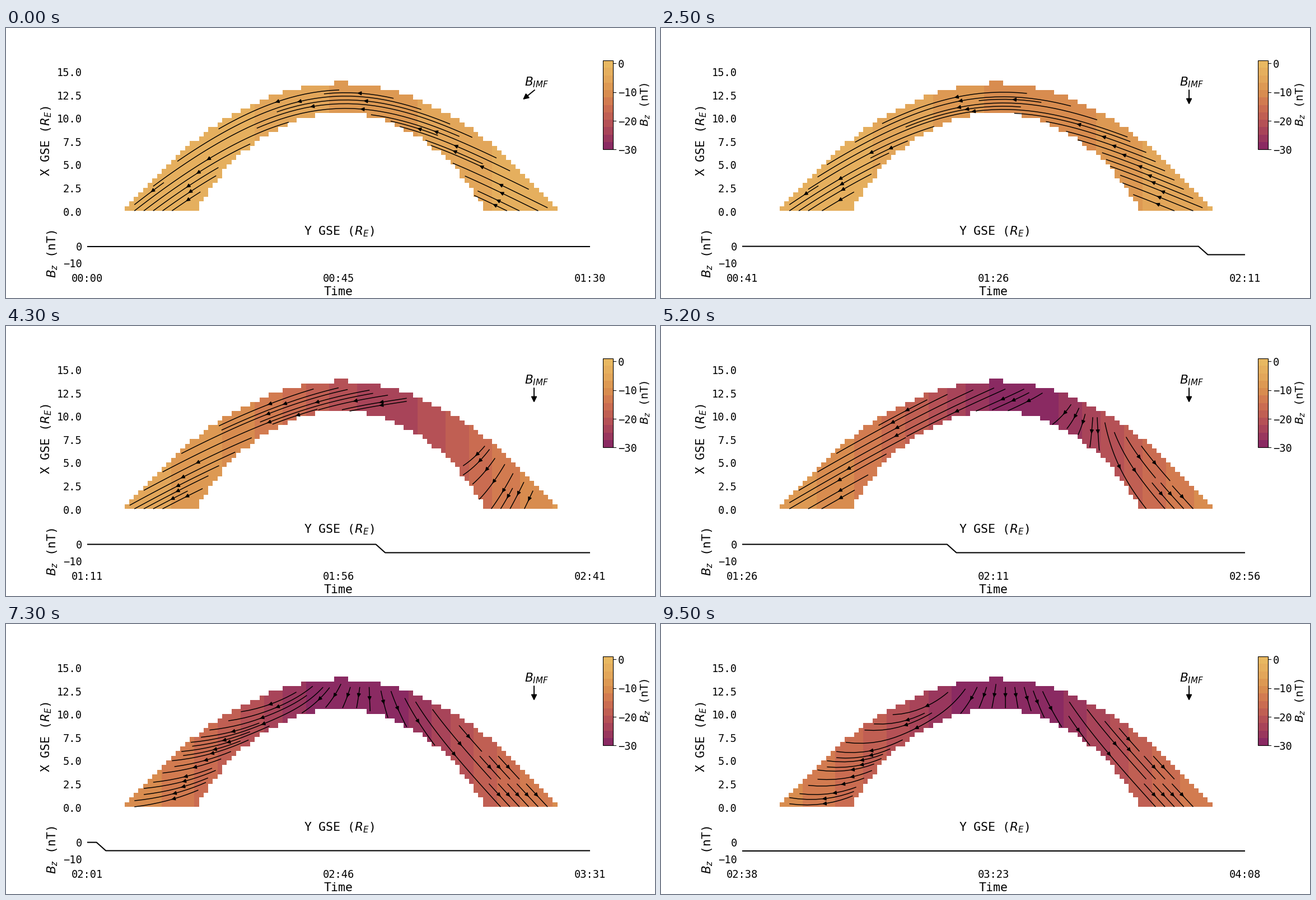
Recreate the animation shown at these times as a matplotlib script. Size 1159 by 483 pixels, loop 9.6 s.

```python
import numpy as np
import matplotlib.pyplot as plt
from matplotlib.animation import FuncAnimation
from matplotlib.collections import LineCollection
from matplotlib.colors import LinearSegmentedColormap
from matplotlib.patches import FancyArrowPatch, Rectangle

W, H, DPI = 1159, 483, 100
FRAMES, INTERVAL = 96, 100
CX, BASE, RE = 594.0, 327.1, 16.63      # pixel of Y=0, pixel of X=0, pixels per Earth radius
NX, NY, CELLS = 120, 40, 60             # field grid and streamline mask
SPAN_Y, SPAN_X = (NX - 1) / 2, (NY - 1) / 2
STEP = 1 / CELLS
FIRST, LAST = 20, 80                    # the sheath only changes between these steps
TURN = 74                               # sample after which the solar wind turns south
TICK, LABEL = 13.5, 15.5

# Sheath: between a parabolic bow shock and a Shue-type magnetopause
y_re, x_re = np.meshgrid(-30 + 0.5 * np.arange(NX), 0.5 * np.arange(NY))
r = np.hypot(x_re, y_re) + 1e-9
shock = 13.51 - 0.0253 * y_re**2
pause = 10.27 - 0.0445 * y_re**2
sheath = (x_re <= shock) & (r >= 10.27 * (2 / (1 + x_re / r))**0.575)
inside = (sheath[:-1, :-1] & sheath[1:, :-1]
          & sheath[:-1, 1:] & sheath[1:, 1:]).tolist()

p = y_re * RE / 390                     # -1 at the left foot, 1 at the right foot
depth = (shock - x_re) / (shock - pause)
flank = np.clip((-94 - RE * y_re) / 80, 0, 1) * (depth - 0.5)
drape = 2 - 34 * np.tanh(1.9 * p) + 4.5 * p**2


def ramp(k, a, b):
    return min(max((k - a) / (b - a), 0), 1)


def south(k):
    """Bz: a peak that deepens, swings right and settles near the nose."""
    keys = [20, 34, 52, 80]
    peak = np.interp(k, keys, [7.5, 17.5, 29, 30.5])
    mid = np.interp(k, keys, [0.16, 0.3, 0.14, 0.07])
    width = np.interp(k, keys, [0.6, 0.6, 0.65, 0.75])
    return -peak / (1 + ((p + RE / 4 / 390 - mid) / width)**2)


def direction(k):
    """Draped field that flattens while a turning front sweeps in from the right."""
    level = 6 + 18 * ramp(k, 34, 52) - 17 * ramp(k, 62, 80)
    bend = 1 - 0.8 * ramp(k, 20, 52) - 0.2 * ramp(k, 62, 80)
    deg = level + bend * (drape - 6)
    centre = max(1.33 - 0.0175 * k, -0.05)
    steep = 5.5 - 2.3 * ramp(k, 52, 80)
    turned = 0.5 + 0.5 * np.tanh(steep * (p - centre))
    deg += ramp(k, 36, 50) * turned * (133 - deg)
    a = np.radians(deg + 36 * ramp(k, 60, 80) * flank)
    u, v = -np.cos(a) / SPAN_Y, -np.sin(a) / SPAN_X
    n = np.hypot(u, v)
    return (u / n).tolist(), (v / n).tolist()


def sample(field, x, y):
    x, y = x * (NX - 1), y * (NY - 1)
    i, j = int(x), int(y)
    if not (0 <= i < NX - 1 and 0 <= j < NY - 1 and inside[j][i]):
        return None
    s, t = x - i, y - j
    return [(g[j][i] * (1 - s) + g[j][i + 1] * s) * (1 - t)
            + (g[j + 1][i] * (1 - s) + g[j + 1][i + 1] * s) * t for g in field]


def cell_of(x, y):
    return round(x * (CELLS - 1)), round(y * (CELLS - 1))


def trace(field, x, y, sign, busy, own):
    """Follow the field until it leaves the sheath or meets another line."""
    pts, total, cell, h = [(x, y)], 0, cell_of(x, y), sign * STEP
    while total < 4:
        a = sample(field, x, y)
        if a is None:
            break
        x2, y2 = x + h * a[0], y + h * a[1]
        if y2 < 0:
            s = y / (y - y2)
            pts.append((x + s * (x2 - x), 0))
            total += s * STEP
            break
        b = sample(field, x2, y2)
        if b is None:
            break
        x += h * (a[0] + b[0]) / 2
        y = max(0, y + h * (a[1] + b[1]) / 2)
        new = cell_of(x, y)
        if new != cell:
            if new in busy:
                break
            busy.add(new)
            own.append(new)
            cell = new
        pts.append((x, y))
        total += STEP
    return pts, total


def spiral(n):
    for lo in range(n // 2):
        hi = n - 1 - lo
        yield from ((i, lo) for i in range(lo, hi + 1))
        yield from ((hi, j) for j in range(lo + 1, hi + 1))
        yield from ((i, hi) for i in range(hi - 1, lo - 1, -1))
        yield from ((lo, j) for j in range(hi - 1, lo, -1))


cache = {}


def streamlines(k):
    k = min(max(k, FIRST), LAST)
    if k in cache:
        return cache[k]
    field, busy, lines = direction(k), set(), []
    for start in spiral(CELLS):
        x, y = start[0] / (CELLS - 1), start[1] / (CELLS - 1)
        if start in busy or sample(field, x, y) is None:
            continue
        own = [start]
        busy.add(start)
        back, s1 = trace(field, x, y, -1, busy, own)
        ahead, s2 = trace(field, x, y, 1, busy, own)
        if s1 + s2 > 0.1:
            q = np.array(back[::-1] + ahead[1:])
            lines.append(np.column_stack([CX + RE * (SPAN_Y * q[:, 0] - 30),
                                          BASE - RE * SPAN_X * q[:, 1]]))
        else:
            busy.difference_update(own)
    cache[k] = lines
    return lines


plt.rcParams["font.family"] = "DejaVu Sans Mono"
fig = plt.figure(figsize=(W / DPI, H / DPI), dpi=DPI, facecolor="white")
ax = fig.add_axes([0, 0, 1, 1])
ax.axis("off")
cmap = LinearSegmentedColormap.from_list("sheath", [
    "#8a2a62", "#a64259", "#bd5a54", "#cf7350", "#da914f", "#e3a85b", "#e8b861"], N=12)
scale = dict(cmap=cmap, vmin=-30, vmax=1)

mesh = ax.pcolormesh(CX + RE * (-30 + 0.5 * np.arange(NX + 1)),
                     BASE - RE * 0.5 * np.arange(NY + 1),
                     np.ma.masked_array(south(0), ~sheath), **scale)
flow = ax.add_collection(LineCollection([], colors="k", linewidths=1.05, zorder=2))


def label(x, y, s, size=LABEL, ha="center", va="baseline", rot=0):
    return ax.text(x, y, s, size=size, ha=ha, va=va, rotation=rot, rotation_mode="anchor")


def tick(x, y, s, ha="right"):
    label(x, y, s.replace("-", "\u2212"), TICK, ha, "center_baseline")


for i in range(7):
    tick(135.5, 328 - RE * 2.5 * i, f"{2.5 * i:.1f}")
tick(135.5, 391, "0")
tick(135.5, 421, "-10")
label(78, 202, "X GSE ($R_E$)", rot=90)
label(595, 370, "Y GSE ($R_E$)")
label(89, 404, "$B_z$ (nT)", rot=90)
label(594, 478, "Time")
label(947.5, 103, "$B_{IMF}$")
clocks = [label(x, 454, "", TICK) for x in (145, 594, 1043)]

# Colour bar
bands = np.linspace(-30, 1, 13)
ax.pcolormesh([1066, 1084], np.linspace(217, 58, 13),
              (bands[:-1, None] + bands[1:, None]) / 2, **scale)
ax.add_patch(Rectangle((1066, 58), 18, 159, fill=False, ec="k", lw=0.8, zorder=3))
for v in (0, -10, -20, -30):
    y = 63.4 - 5.13 * v
    ax.plot([1084, 1089], [y, y], "k", lw=0.8)
    tick(1093, y, str(v), "left")
label(1148, 137, "$B_z$ (nT)", 14.2, rot=90)

wind, = ax.plot([], [], "k", lw=1.5)
wind.set_clip_path(Rectangle((145, 380), 898, 50, transform=ax.transData))
imf = ax.add_patch(FancyArrowPatch((944, 111), (923, 128), arrowstyle="-|>", color="k",
                                   mutation_scale=15, lw=1.4, shrinkA=0, shrinkB=0))
ax.set_xlim(0, W)
ax.set_ylim(H, 0)
heads = []


def add_head(line):
    s = np.cumsum(np.hypot(*np.diff(line, axis=0).T))
    n = np.searchsorted(s, s[-1] / 2)
    heads.append(ax.add_patch(FancyArrowPatch(
        line[n], line[n:n + 2].mean(axis=0), arrowstyle="-|>",
        mutation_scale=10, color="k", lw=1.05, zorder=3)))


def update(k):
    minute = k * 5 // 3
    for text, m in zip(clocks, (minute, minute + 45, minute + 90)):
        text.set_text(f"{m // 60:02d}:{m % 60:02d}")

    i = np.arange(k, k + 56)
    wind.set_data(145 + (i - k) * 898 / 54, np.where(i <= TURN, 390.6, 405.5))
    if k + 54 > TURN:
        imf.set_positions((943, 111), (943, 137))
    else:
        imf.set_positions((944, 111), (923, 128))

    mesh.set_array(np.ma.masked_array(south(k), ~sheath))
    lines = streamlines(k)
    flow.set_segments(lines)
    while heads:
        heads.pop().remove()
    for line in lines:
        add_head(line)
    return []


anim = FuncAnimation(fig, update, frames=FRAMES, interval=INTERVAL,
                     repeat=True, repeat_delay=0, init_func=lambda: update(0))
plt.show()
```
